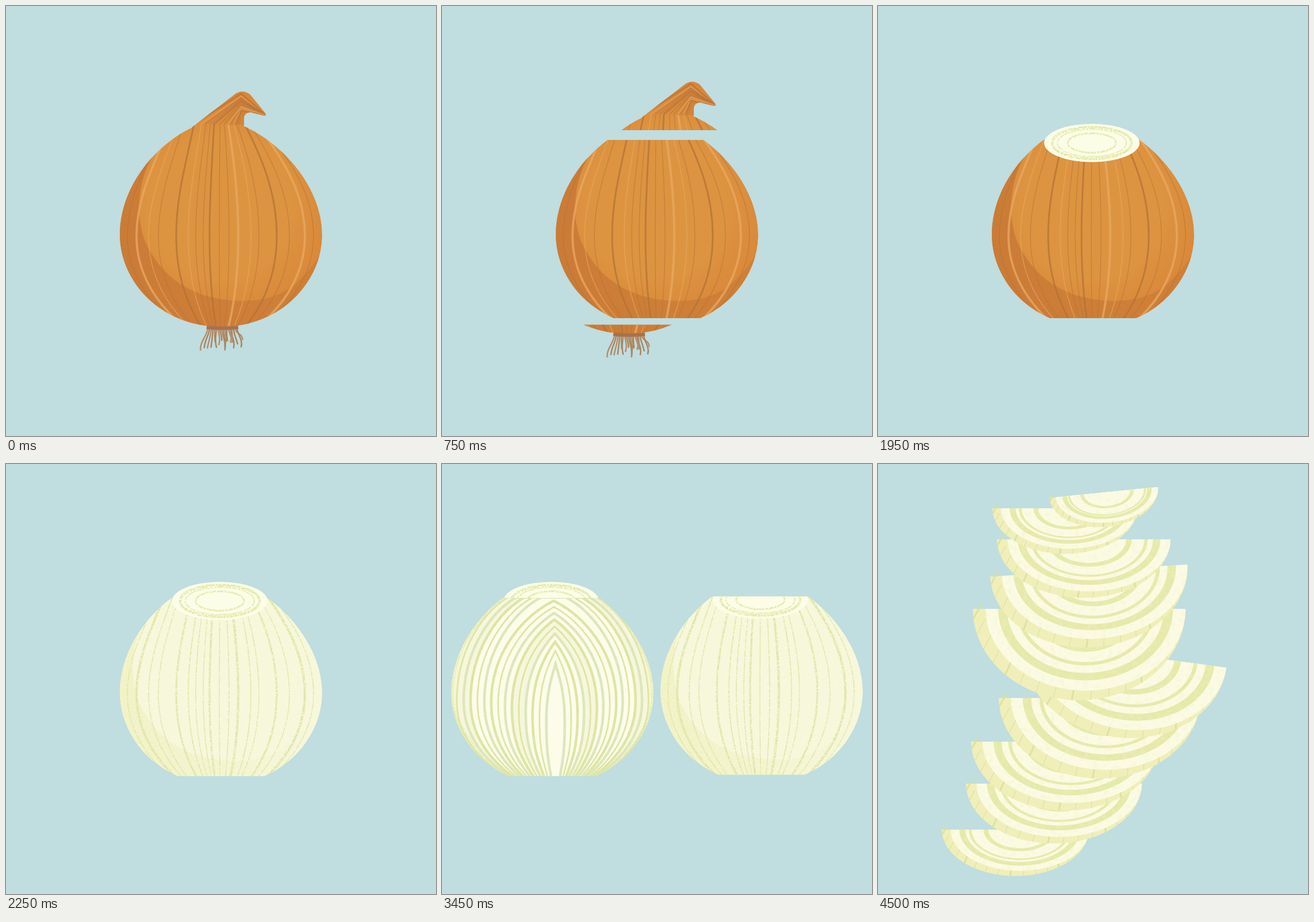
An HTML page that plays this animation: 748x748 px, repeating every 5.25 s.

```html
<!DOCTYPE html>
<html lang="en">
<head>
<meta charset="utf-8">
<title>Slicing an onion</title>
<style>
  html, body { margin: 0; height: 100%; overflow: hidden; background: #c0dde0; }
  svg { display: block; width: 100vw; height: 100vh; }
  .scene {
    visibility: hidden;
    animation: show 5250ms step-end infinite;
    animation-delay: calc((var(--i) - 7) * 750ms);
  }
  @keyframes show {
    from { visibility: visible; }
    14.28572%, to { visibility: hidden; }
  }
</style>
</head>
<body>
<svg id="stage" viewBox="0 0 748 748"></svg>
<script>
const CREAM = '#fdfdeb', PALE = '#f6f7da', GREEN = '#dae29c', MIST = '#d9e4b6';
const SKY = '#c0dde0', MID = 374;

const OUTLINE = `M322 212 L397 154 Q411 143 425 154 L451 186 Q454 191 448 191 L426 185
  Q414 185 414 197 V209 C484 240 550 318 550 398 C550 478 480 558 374 558
  C268 558 198 478 198 398 C198 318 255 245 322 212Z`;
const SHADE = `M262 250 C222 310 225 385 250 425 C285 490 350 513 412 513
  C460 512 500 502 545 435 L570 600 H180 V250Z`;

// stripes, placed by their x at the widest part
const kind = (light, width, xs) => xs.map(x => ({ x, light, width }));
const STRIPES = [
  ...kind(false, 1.3, [211, 265, 330, 343, 371, 388, 440, 493, 535]),
  ...kind(true, 1.6, [248, 317, 426]),
  ...kind(false, 3, [296, 354, 471]),
  ...kind(true, 3.8, [227, 404, 520])
];

const range = n => [...Array(n).keys()];
const draw = (n, fn) => range(n).map(fn).join('');
const path = (d, attrs) => `<path d="${d}" ${attrs}/>`;
const line = (d, color, width, alpha = 1) =>
  path(d, `fill="none" stroke="${color}" stroke-width="${width}" stroke-opacity="${alpha}" stroke-linejoin="round"`);
const move = (x, y, s) => `<g transform="translate(${x} ${y})">${s}</g>`;
const clip = (id, s) => `<g clip-path="url(#${id})">${s}</g>`;
const rough = s => `<g filter="url(#rough)">${s}</g>`;
const use = id => `<use href="#${id}"/>`;
const grain = (color, alpha) =>
  `<rect x="190" y="140" width="370" height="425" fill="${color}" opacity="${alpha}" filter="url(#rough)"/>`;

let seed = 7;
const random = () => (seed = seed * 16807 % 2147483647) / 2147483647;

const topX = x => MID + (x - MID) * (x < MID ? .6 : .42);

function meridian(x) {
  const d = x - MID;
  return `M${topX(x)} 205 C${MID + d * .77} 270 ${x} 330 ${x} 400
    C${x} 460 ${MID + d * .8} 515 ${MID + d * .42} 560`;
}

// stripes run on into the neck, bend at its ridge and meet in the tip
function neck() {
  const lines = STRIPES.map(({ x, light, width }) => {
    const t = topX(x), u = (t - 322) / 92;
    if (u < 0 || u > 1) return '';
    const bend = o => `M${t + o * 60} 205 L409 ${150 + 36 * (u + o)} L452 190`;
    return line(bend(0), light ? '#e5a45c' : '#b3713a', Math.min(width, 2.4), .7) +
      line(bend(.06), '#b3713a', 1, .45);
  });
  return path('M384 207 L407 178 L426 185 L414 207Z', 'fill="#bd7434" opacity=".35"') + lines.join('');
}

function roots() {
  const strands = draw(18, i => {
    const a = 351 + i * 3, b = a + (a - 373) * .3 + random() * 12 - 6, y = 580 + random() * 21;
    return line(`M${a} 560 C${a} 572 ${b + random() * 10 - 5} ${y - 14} ${b} ${y}`,
      i % 2 ? '#a8835c' : '#b18d68', 2.4);
  });
  return strands + line('M349 559 Q376 562 404 559', '#a8714c', 6);
}

const brownSkin = () => clip('outline',
  path(OUTLINE, 'fill="url(#glow)"') +
  path(SHADE, 'fill="url(#brown)"') +
  rough(path(SHADE, 'fill="#c47434" opacity=".15"')) +
  STRIPES.map(({ x, light, width }) =>
    line(meridian(x), light ? '#e8aa62' : '#b37338', width, width < 2 ? .6 : .75)).join('') +
  neck());

const paleSkin = () => clip('outline',
  path(OUTLINE, `fill="${PALE}"`) +
  move(-11, 4, path(SHADE, 'fill="url(#straw)" opacity=".3"') + rough(path(SHADE, 'fill="url(#straw)" opacity=".6"'))) +
  rough(STRIPES.map(({ x, width }) => line(meridian(x), GREEN, width + .4)).join('')) +
  grain('#fcfce6', .15));

function cut() {
  const ring = (rx, width) =>
    `<ellipse cx="372" cy="238.3" rx="${rx}" ry="${rx * .4}" fill="none" stroke="#e2e9ac" stroke-width="${width}"/>`;
  return '<ellipse cx="372" cy="238.3" rx="83" ry="33.3" fill="#fcfde7"/>' +
    rough(ring(69, 4.5) + ring(60, 2) + ring(42, 3));
}

// layer i of the halved bulb, counted from the heart: pointed up to 8, then cut open at the top
function arch(i) {
  const h = 16 + 11.6 * i;
  const open = i > 8 ? 8 + 14 * (i - 8) : 0;
  const top = i > 8 ? 232 : 348 - 110 * (i / 8) ** .75;
  const wide = 415 + (top - 238) * .3;
  const cx = 380 - h / 30;
  const half = s => {
    const at = (dx, y) => `${cx + s * dx} ${y}`;
    return [at(open, top), at(open + .48 * (h - open), top + 26), at(h, top + .5 * (wide - top)), at(h, wide),
      at(h, wide + 55), at(.8 * h, 512), at(.45 * h, 548)];
  };
  const curve = p => `C${p.slice(1, 4)} C${p.slice(4)}`;
  const left = half(-1), right = half(1).reverse();
  const fill = i % 8 == 4 || i % 8 == 5 ? PALE : CREAM;
  return path(`M${left[0]} ${curve(left)} L${right[0]} ${curve(right)}Z`,
    `fill="${fill}" stroke="${i % 3 ? GREEN : MIST}" stroke-width="${i % 3 == 1 ? 2.8 : 4.5}"`);
}

const halved = () => clip('outline',
  path(OUTLINE, 'fill="#f4f6d2"') + draw(14, i => arch(13 - i)) +
  rough(line(OUTLINE, GREEN, 8, .6) +
    path('M200 420 Q240 515 330 560 H200Z M550 420 Q510 515 425 560 H550Z', `fill="${GREEN}" opacity=".45"`)) +
  grain('#fbfbe2', .2));

// half-moon slice: centre of the flat side, half width, tilt; wider slices are also rounder
function slice([cx, y, a, tilt = 0]) {
  const round = Math.min(1, Math.max(0, (a - 125) / 59));
  const depth = a * (.63 + .23 * round ** 2), rim = 1 + depth * .1, side = a * .12;
  const fx = cx + side / 2, fa = a - side / 2, fb = depth - rim;
  const moon = (x, rx, ry, fill) =>
    path(`M${x - rx} ${y} A${rx} ${ry} 0 0 0 ${x + rx} ${y}Z`, `fill="${fill}"`);
  const ring = (k, w) => moon(fx, fa * (k + w), fb * (k + w), '#e5eaaa') +
    moon(fx, fa * (k - w), fb * (k - w), '#fbfbe4');
  const ticks = draw(16, i => {
    const q = Math.PI * (1 - (i + .6) / 18), c = Math.cos(q);
    const x = cx + a * c, b = y + depth * Math.sin(q);
    return line(`M${x} ${b} l${rim * (.25 - .6 * c)} ${-rim * 1.5}`, '#d9df9c', i % 4 ? 1.2 : 3, .85);
  });
  return `<g transform="rotate(${tilt} ${cx} ${y})">` +
    moon(cx, a, depth, '#f0efb9') + ticks + moon(fx, fa, fb, '#fbfbe4') +
    ring(.83, .045) + ring(.82 - a * .0008, .02) + ring(.49, .035) +
    `<g filter="url(#blotch)" opacity=".3">${moon(fx, fa, fb, '#f1f2c8')}</g></g>`;
}

// bottom of the pile first
const SLICES = [
  [239, 636, 128], [306, 556, 153], [326, 483, 164], [385.5, 407, 175.5], [429.5, 331, 178, 7.5],
  [350, 252, 185], [366.5, 185.5, 172, -3.5], [358, 131, 151], [325, 77, 126], [392.5, 49.5, 95, -5.7]
];

const gaps = draw(9, i =>
  `<rect x="190" y="${277 + 30.3 * i + 3.5 * Math.sin(Math.PI * i / 8)}" width="366" height="5.2" fill="${SKY}"/>`);

const band = (id, y, h) => `<clipPath id="${id}"><rect y="${y}" width="748" height="${h}"/></clipPath>`;
const fade = (id, color, end) => `<linearGradient id="${id}" gradientUnits="userSpaceOnUse" x1="200" x2="550">
  <stop stop-color="${color}" stop-opacity=".9"/><stop offset="1" stop-color="${color}" stop-opacity="${end}"/></linearGradient>`;
const noise = (id, freq, gain, bias) =>
  `<filter id="${id}" x="-5%" y="-5%" width="110%" height="110%" color-interpolation-filters="sRGB">
    <feTurbulence type="fractalNoise" baseFrequency="${freq}" numOctaves="3" seed="4"/>
    <feColorMatrix values="0 0 0 0 0 0 0 0 0 0 0 0 0 0 0 ${gain} 0 0 0 ${bias}" result="n"/>
    <feComposite in="SourceGraphic" in2="n" operator="in"/></filter>`;

const defs = `<defs>
  <clipPath id="outline"><path d="${OUTLINE}"/></clipPath>
  ${band('top', 0, 233)}${band('mid', 233, 310)}${band('low', 542.5, 100)}
  ${fade('brown', '#ca7b37', .5)}${fade('straw', '#ecedb0', 0)}
  <radialGradient id="glow" gradientUnits="userSpaceOnUse" cx="372" cy="350" r="215">
    <stop offset=".55" stop-color="#dd9440"/><stop offset="1" stop-color="#d88538"/></radialGradient>
  ${noise('rough', .38, 5, -1.7)}${noise('blotch', .12, 5, -2.4)}
  <g id="brownSkin">${brownSkin()}</g><g id="paleSkin">${paleSkin()}</g>
  <g id="roots">${roots()}</g><g id="cut">${cut()}</g>
</defs>`;

const brownMid = clip('mid', use('brownSkin'));
const paleCut = clip('mid', use('paleSkin') + use('cut'));

const scenes = [
  use('brownSkin') + use('roots'),
  move(24, -17, clip('top', use('brownSkin'))) + brownMid +
    move(-51, 12, clip('low', use('brownSkin') + use('roots'))),
  brownMid + use('cut'),
  clip('mid', use('paleSkin')) + use('cut'),
  move(-182, 0, use('cut') + clip('mid', halved())) + move(182, -2.5, paleCut),
  move(-2, -6, paleCut) + gaps,
  SLICES.map(slice).join('')
];

document.getElementById('stage').innerHTML = defs +
  scenes.map((s, i) => `<g class="scene" style="--i:${i}">${s}</g>`).join('');
</script>
</body>
</html>
```
